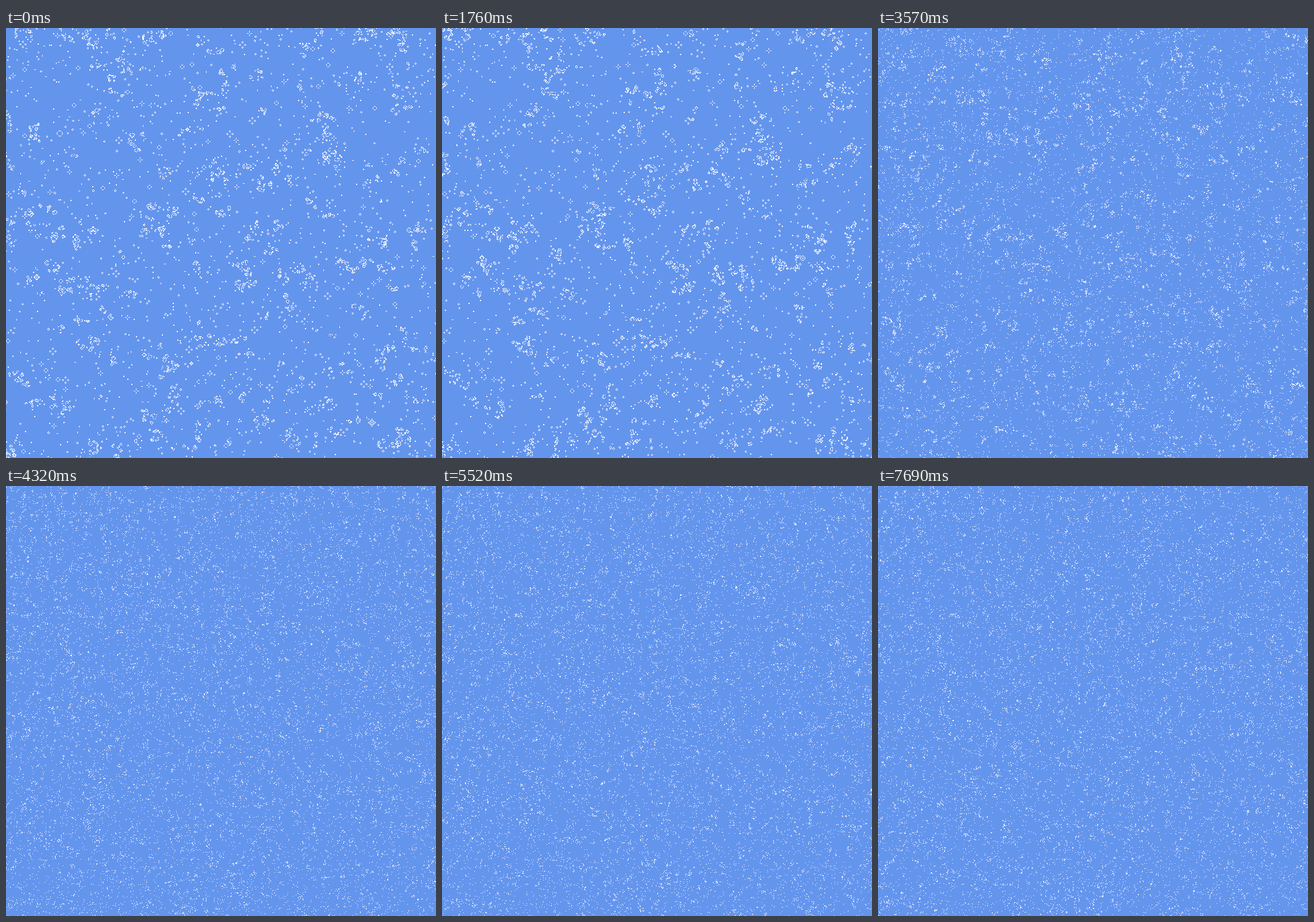
These frames come from a looping animation (748 by 748 pixels, 7.76 s). An HTML page with a canvas:

```html
<!DOCTYPE html>
<html>
<head>
<meta charset="utf-8">
<title>Game of Life</title>
<style>
  html, body { margin: 0; width: 100%; height: 100%; overflow: hidden; background: #6495ed; }
  canvas { display: block; width: 748px; height: 748px; }
</style>
</head>
<body>
<canvas width="748" height="748"></canvas>
<script>
const SIZE = 748, LOOP = 7760, FRAMES = 111, WARM_UP = 100;
const COLS = 94, ROWS = 2992;            // 32 cells per word, wrapped at the edges
const BLUE = 0xffed9564, WHITE = 0xffffffff;

const ctx = document.querySelector('canvas').getContext('2d');
const image = ctx.createImageData(SIZE, SIZE);
const pixels = new Uint32Array(image.data.buffer);

const cells = new Int32Array(COLS * ROWS);
const low = new Int32Array(COLS * ROWS);
const high = new Int32Array(COLS * ROWS);

let seed = 20117;
function random() {
  seed = seed + 0x6d2b79f5 | 0;
  let r = Math.imul(seed ^ seed >>> 15, seed | 1);
  r ^= r + Math.imul(r ^ r >>> 7, r | 61);
  return r ^ r >>> 14;
}

// Sparse soup: each cell is alive with a chance of 11/128.
function sow() {
  for (let i = 0; i < cells.length; i++) {
    const eighth = random() & random() & random();
    cells[i] = eighth & (random() | random() & (random() | random()));
  }
}

function step() {
  // Two-bit count of each cell and its left and right neighbours.
  for (let y = 0; y < ROWS; y++) {
    const row = y * COLS;
    let before = cells[row + COLS - 1], here = cells[row];
    for (let x = 0; x < COLS; x++) {
      const after = cells[x + 1 < COLS ? row + x + 1 : row];
      const left = here << 1 | before >>> 31;
      const right = here >>> 1 | after << 31;
      const odd = left ^ right;
      low[row + x] = odd ^ here;
      high[row + x] = left & right | odd & here;
      before = here;
      here = after;
    }
  }
  // Add three rows: alive on a total of 3, unchanged on 4.
  for (let y = 0; y < ROWS; y++) {
    const row = y * COLS;
    const up = (y ? y - 1 : ROWS - 1) * COLS;
    const down = (y + 1 < ROWS ? y + 1 : 0) * COLS;
    for (let x = 0; x < COLS; x++) {
      const a = low[up + x], b = low[row + x], c = low[down + x];
      const ones = a ^ b ^ c, carry = a & b | (a ^ b) & c;
      const d = high[up + x], e = high[row + x], f = high[down + x];
      const p = d ^ e, q = f ^ carry, odd = p ^ q;
      const both = d & e, rest = f & carry;
      const three = ones & odd & ~(both | rest);
      const four = ~ones & ~odd & (p & q | both ^ rest);
      cells[row + x] = three | four & cells[row + x];
    }
  }
}

const scaleAt = n => n < 28 ? 1 : n < 56 ? 2 : 4;

function view(scale) {
  const out = new Uint8Array(SIZE * SIZE);
  const left = COLS * 16 - SIZE / 2 * scale, top = ROWS / 2 - SIZE / 2 * scale;
  for (let y = 0, i = 0; y < SIZE; y++) {
    const row = (top + y * scale) * COLS;
    for (let x = 0; x < SIZE; x++) {
      const cx = left + x * scale;
      out[i++] = cells[row + (cx >> 5)] >>> (cx & 31) & 1;
    }
  }
  return out;
}

const views = [];
function frame(n) {
  while (views.length <= n) {
    views.push(view(scaleAt(views.length)));
    step();
  }
  return views[n];
}

let shown = -1;
function draw(now) {
  const t = Math.max(0, now - start) % LOOP;
  const n = Math.floor(t / LOOP * FRAMES);
  if (n !== shown) {
    const alive = frame(n);
    for (let i = 0; i < alive.length; i++) pixels[i] = alive[i] ? WHITE : BLUE;
    ctx.putImageData(image, 0, 0);
    shown = n;
  }
  requestAnimationFrame(draw);
}

sow();
for (let i = 0; i < WARM_UP; i++) step();
const start = performance.now();
draw(start);
</script>
</body>
</html>
```
